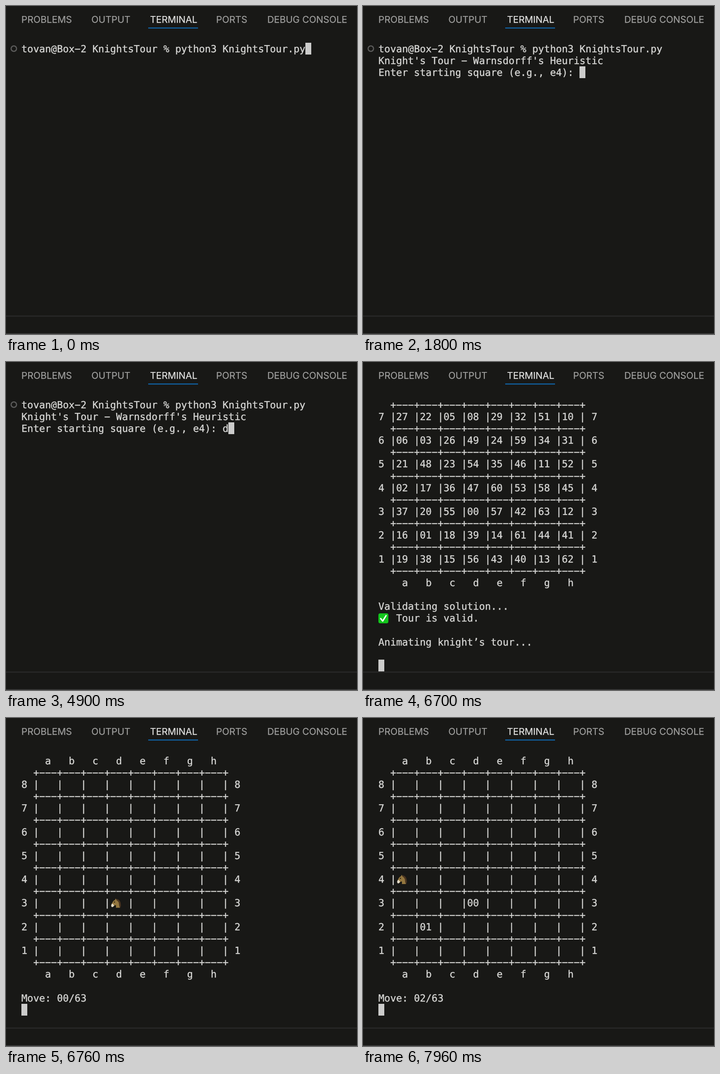
An HTML page that plays this animation: 775x723 px, repeating every 8000 ms.

```html
<!DOCTYPE html>
<html lang="en">
<head>
<meta charset="utf-8">
<title>Knight's Tour terminal</title>
<style>
  html, body { margin: 0; width: 100%; height: 100%; overflow: hidden; background: #181816; }
  svg { display: block; width: 775px; height: 723px; }
  text { white-space: pre; text-rendering: geometricPrecision; }
  .tabs { font: 20.6px Inter, Roboto, sans-serif; fill: #9f9f9e; stroke: #9f9f9e; stroke-width: .25px; }
  .tabs .active { fill: #e2e2e1; stroke: #e2e2e1; }
  .screen { font: 21.71px "DejaVu Sans Mono", monospace; fill: #d6d6d4; visibility: hidden; }
  .screen text { stroke: #d6d6d4; stroke-width: .4px; }
  .screen .cursor { fill: #cccccb; }
</style>
</head>
<body>
<svg viewBox="0 0 775 723">
  <defs>
    <g id="horse">
      <path fill="#4b3520" d="M12 1 Q20 2 21.500 10 Q23 15 21 20 L14 20 L10 6Z"/>
      <path fill="#94773f" d="M10.500 0 L12.500 4 Q18 7 18 13 Q18 17 20 20.500 L11 20.500 Q12 16 10.500 14.500 Q7 15.500 5 18 Q2 20 1 16 Q1 13 4 8 Q6 4 9 3.500Z"/>
      <path fill="#e2d9c6" d="M2.500 11.500 Q6 12 7 16 Q5 19.500 2.500 19 Q0 17.500 1 14Z"/>
      <circle cx="8" cy="8" r="1.200" fill="#221910"/>
    </g>
    <g id="check">
      <rect width="22" height="22" rx="4" fill="#12c51c"/>
      <path d="M5 11.500 L9.500 17 L17 5" fill="none" stroke="#fff" stroke-width="3" stroke-linecap="round" stroke-linejoin="round"/>
    </g>
    <circle id="ring" cx="17.300" cy="94" r="6" fill="none" stroke="#5c5c5b" stroke-width="2.500"/>
  </defs>
  <g class="tabs">
    <text x="34" y="36.500">PROBLEMS</text>
    <text x="188.500" y="36.500">OUTPUT</text>
    <text class="active" x="318" y="36.500">TERMINAL</text>
    <text x="464" y="36.500">PORTS</text>
    <text x="577" y="36.500">DEBUG CONSOLE</text>
  </g>
  <rect x="314" y="47.500" width="110" height="2" fill="#0f70bf"/>
  <rect y="682.500" width="775" height="2" fill="#2d2d2c"/>
  <rect y="721.500" width="775" height="1.500" fill="#3f3f3e"/>
  <g id="terminal"></g>
</svg>
<script>
const LOOP = 8000, LEFT = 34, TOP = 81, CELL = 13.07, LINE = 26.15;
const colX = c => LEFT + c * CELL;
const rowY = r => TOP + r * LINE;

const FILES = [...'abcdefgh'];
const letters = '    ' + FILES.join('   ');
const rule = '  ' + '+---'.repeat(8) + '+';
const rank = (n, cells) => `${n} |${cells.join(' |')} | ${n}`;

const prompt = 'tovan@Box-2 KnightsTour % python3 KnightsTour.py';
const ask = 'Enter starting square (e.g., e4): ';

function shell(lines, row, col) {
  return { lines, row, col, icons: '<use href="#ring"/>' };
}

function asking(typed) {
  return shell([prompt, "Knight's Tour - Warnsdorff's Heuristic", ask + typed], 2, ask.length + typed.length);
}

function solution() {
  const tour = [
    '27 22 05 08 29 32 51 10', '06 03 26 49 24 59 34 31',
    '21 48 23 54 35 46 11 52', '02 17 36 47 60 53 58 45',
    '37 20 55 00 57 42 63 12', '16 01 18 39 14 61 44 41',
    '19 38 15 56 43 40 13 62'
  ];
  const lines = [rule, ...tour.flatMap((r, i) => [rank(7 - i, r.split(' ')), rule]), letters, '',
    'Validating solution...', '   Tour is valid.', '', 'Animating knight’s tour...'];
  return { lines, row: 22, col: 0,
    icons: `<use href="#check" x="34" y="${rowY(18) + 2.3}"/>` };
}

function board(path) {
  const last = path.length - 1, lines = [letters, rule];
  for (let n = 8; n > 0; n--) {
    const cells = FILES.map(f => {
      const i = path.indexOf(f + n);
      return i < 0 || i === last ? '  ' : '0' + i;
    });
    lines.push(rank(n, cells), rule);
  }
  lines.push(letters, '', `Move: 0${last}/63`);
  const [file, n] = path[last];
  const x = colX(3 + 4 * FILES.indexOf(file)) + 1.5, y = rowY(18 - 2 * n) + 3;
  return { lines, row: 21, col: 0, icons: `<use href="#horse" x="${x}" y="${y}"/>` };
}

const screens = [
  [0, shell([prompt], 0, prompt.length)],
  [1730, shell([prompt], 1, 0)],
  [1800, asking('')],
  [4900, asking('d')],
  [5160, asking('d3')],
  [6700, solution()],
  [6760, board(['d3'])],
  [7360, board(['d3', 'b2'])],
  [7960, board(['d3', 'b2', 'a4'])]
];

// The terminal face has wide hyphens, so the minus glyph stands in.
const draw = (line, r) => `<text x="${LEFT}" y="${rowY(r) + 20.6}">${line.replace(/-/g, '−')}</text>`;

let css = '', svg = '';
screens.forEach(([start, s], i) => {
  const end = i + 1 < screens.length ? screens[i + 1][0] : LOOP;
  const pct = t => t / LOOP * 100 + '%';
  css += `@keyframes s${i} { 0%, 100% { visibility: hidden }
    ${pct(start)} { visibility: visible } ${pct(end)} { visibility: hidden } }\n`;
  svg += `<g class="screen" style="animation: s${i} ${LOOP}ms step-end infinite">
    ${s.lines.map(draw).join('')}${s.icons}
    <rect class="cursor" x="${Math.floor(colX(s.col))}" y="${Math.floor(rowY(s.row))}" width="13" height="26"/></g>`;
});
document.head.appendChild(document.createElement('style')).textContent = css;
document.getElementById('terminal').innerHTML = svg;
</script>
</body>
</html>
```
